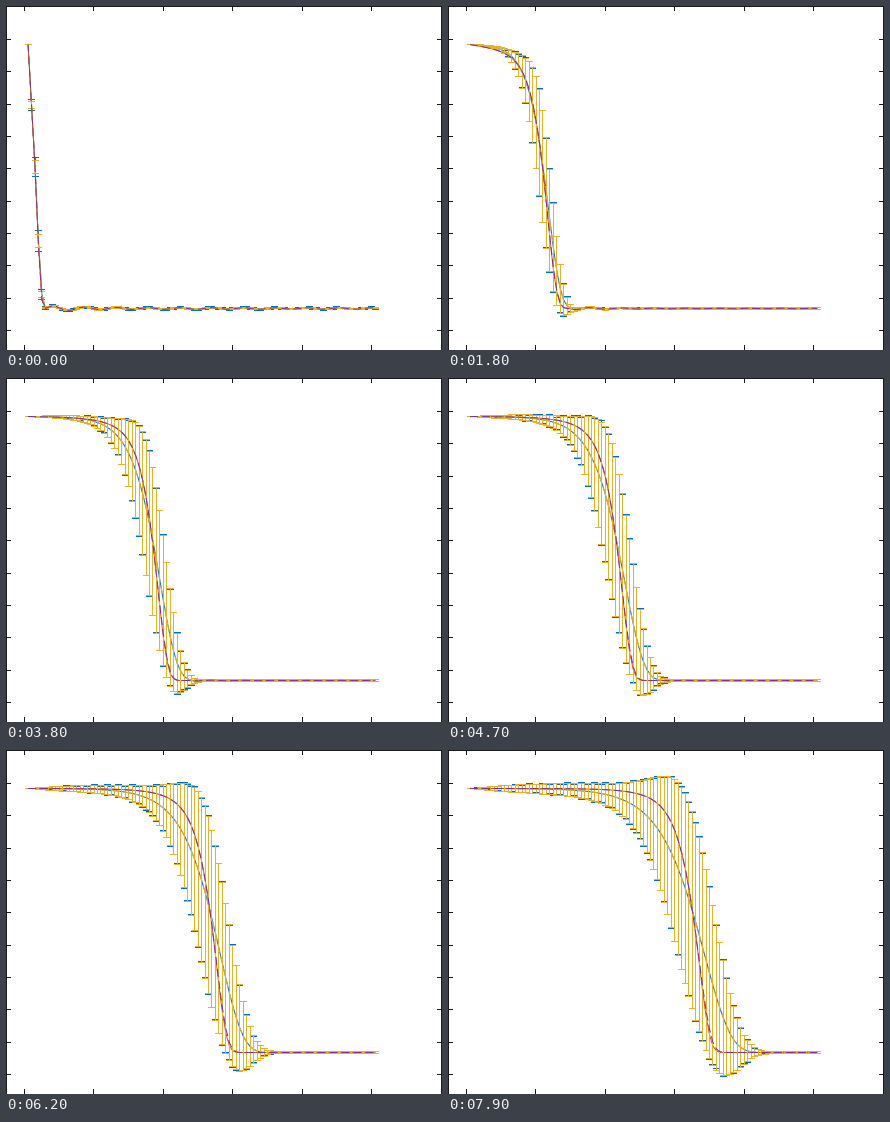
These frames come from a looping animation (436x344 px, 8000 ms). A matplotlib script:

```python
import numpy as np
import matplotlib.pyplot as plt
from matplotlib.animation import FuncAnimation
from matplotlib.collections import LineCollection

W, H, DPI = 436, 344, 100
PX = 72 / DPI
FRAMES, INTERVAL = 80, 100
BLUE, ORANGE, YELLOW, PURPLE = "#0072BD", "#D95319", "#EDB120", "#7E2F8E"
LEFT, UNIT_X = 18, 69.4
TOP, DROP = 38, 264
CAP = 3.5

index = np.arange(1, 102)
x = LEFT + .1 + UNIT_X / 20 * index
cols = np.round(x)


def settle(n, time):
    """Start-up transient: 1 at the beginning, fading to 0."""
    return np.exp(-n / time)


def front(hazard):
    return 1 - np.exp(-hazard)


def state(n):
    centre = 57.5 + 2.4 * n - 28.5 * settle(n, 10)
    wide = 8 + .23 * n - 3.5 * settle(n, 4)
    sharp = 8.2 + .038 * n - 4.4 * settle(n, 4)
    peak = DROP * (.2 + .002 * n - .16 * settle(n, 10))

    off = x - centre
    edge = 1 - np.exp(-(x - x[0]) / (10 - 8.5 * settle(n, 4)))

    # Standing ripple ahead of the front
    ahead = np.maximum(off - 2 * wide, 0)
    size = (.7 + 2.4 * np.exp(-ahead / 35)) * settle(n, 22)
    ripple = -size * np.cos(2 * np.pi * (x - 110) / 31.8) * np.minimum(ahead / 6, 1)

    def height(hazard):
        return TOP + DROP * edge * front(hazard) + ripple

    # Steep curves: a front with a slow shoulder behind it
    shoulder = .07 * np.exp(np.minimum(off / sharp + 2.1, 4) * sharp / 24)
    exact = height(np.exp(off / sharp - .5) + shoulder)
    lead = off / sharp * (1 + .1 * n / FRAMES * (off > 0))
    early = height(np.exp(lead - .5) + shoulder)

    # Averaged curve and its deviation
    u = np.minimum(off / wide - .35, 5)
    mean = height(np.exp(u))
    v = .76 * (u + .45)
    power = np.where(v < 0, 1.9 + 1.5 * settle(n, 10), 1)
    bump = np.exp(power * (v - np.exp(v) + 1))
    haze = .1 * n * (1 - np.exp(-(x - LEFT) / 80)) * np.exp(-np.exp(u))
    dev = edge * (peak * bump + haze) + .9 * (off > 0)
    return mean, dev, exact, early


fig = plt.figure(figsize=(W / DPI, H / DPI), dpi=DPI, facecolor="white")
ax = fig.add_axes([0, 0, 1, 1])
ax.set_xlim(-.5, W - .5)
ax.set_ylim(H - .5, -.5)
ax.axis("off")


def segments(color, z):
    lines = LineCollection([], colors=color, linewidths=PX, zorder=z)
    lines.set_snap(False)
    ax.add_collection(lines, autolim=False)
    return lines


def curve(color, z, dashed=False):
    line, = ax.plot([], [], color=color, lw=PX, zorder=z)
    if dashed:
        line.set_dashes([8, 4])
    return line


class ErrorBars:
    def __init__(self, color, z, dashed=False):
        self.bars = segments(color, z)
        self.line = curve(color, z + .1, dashed)

    def update(self, mean, dev):
        lo, hi = np.round(mean - dev), np.round(mean + dev)
        parts = [[(a, b), (a, c)] for a, b, c in zip(cols, lo, hi)]
        for ends in (lo, hi):
            parts += [[(a - CAP, b), (a + CAP, b)] for a, b in zip(cols, ends)]
        self.bars.set_segments(parts)
        self.line.set_data(x, mean)


def draw_box():
    right, low = W - 1, H - .5
    parts = [[(0, -.5), (0, low)], [(right, -.5), (right, low)],
             [(-.5, 0), (W - .5, 0)]]
    for k in range(6):
        t = round(LEFT + UNIT_X * k)
        parts += [[(t, 0), (t, 4.5)], [(t, low - 5), (t, low)]]
    for k in range(10):
        t = round(33 + 32.35 * k)
        parts += [[(0, t), (4.5, t)], [(right - 4.5, t), (right, t)]]
    segments("#1a1a1a", 9).set_segments(parts)


draw_box()
bars_a = ErrorBars(BLUE, 1)
line_a = curve(ORANGE, 2)
bars_b = ErrorBars(YELLOW, 3, dashed=True)
line_b = curve(PURPLE, 4, dashed=True)


def update(n):
    mean, dev, exact, early = state(n)
    gap = np.sin(1.7 * index + .9 * n) * np.minimum(1.1, .15 * dev)
    bars_a.update(mean, dev + gap)
    bars_b.update(mean, dev * (1 - .35 * settle(n, 3)))
    line_a.set_data(x, early)
    line_b.set_data(x, exact)
    return []


anim = FuncAnimation(fig, update, frames=FRAMES, interval=INTERVAL,
                     init_func=lambda: update(0), repeat=True, repeat_delay=0)
plt.show()
```
